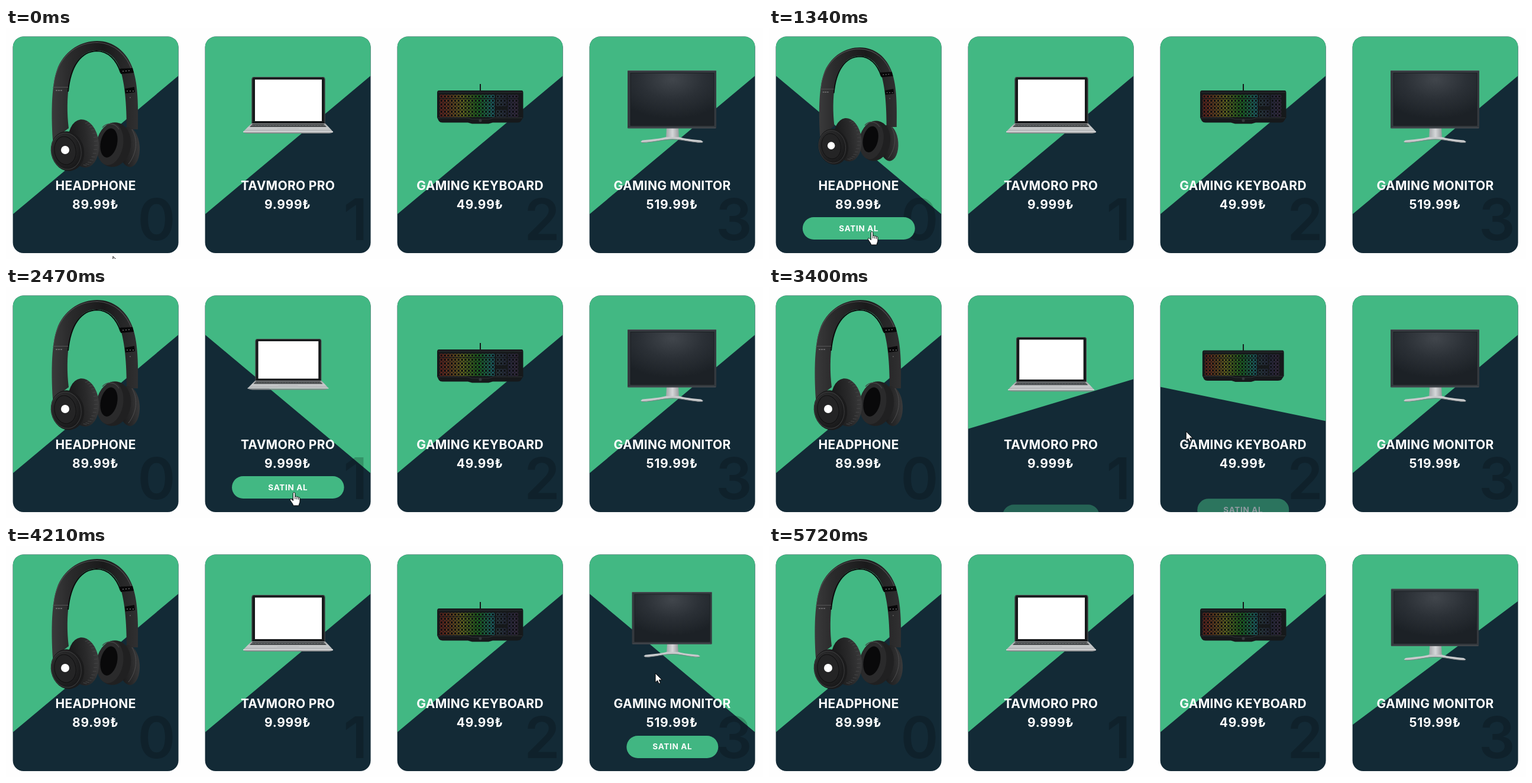
An HTML page that plays this animation: 1280x392 px, repeating every 5750 ms.

```html
<!DOCTYPE html>
<html lang="tr">
<head>
<meta charset="utf-8">
<title>Product cards</title>
<style>
  html, body { margin: 0; width: 100%; height: 100%; overflow: hidden; background: #fefefe; }
  svg { display: block; width: 100vw; height: 100vh; }
  text { font-family: Inter, "Open Sans", sans-serif; font-weight: 700; fill: #fff; text-anchor: middle; }
  .title { font-size: 21px; letter-spacing: .3px; }
  .price { font-size: 21px; letter-spacing: .7px; }
  .digit { font-size: 97px; font-weight: 600; text-anchor: end; fill: #000; opacity: .2; }
  .label { font-size: 13.5px; letter-spacing: .7px; }
</style>
</head>
<body>
<svg id="stage" viewBox="0 0 1280 392" xmlns="http://www.w3.org/2000/svg">
  <defs>
    <linearGradient id="band">
      <stop offset="0" stop-color="#3a3a3b"/><stop offset=".2" stop-color="#2b2b2c"/>
      <stop offset=".6" stop-color="#1a1a1b"/><stop offset="1" stop-color="#303031"/>
    </linearGradient>
    <linearGradient id="pad">
      <stop offset="0" stop-color="#161617"/><stop offset=".6" stop-color="#29292a"/><stop offset="1" stop-color="#3a3a3b"/>
    </linearGradient>
    <radialGradient id="cup" cx=".4" cy=".35" r=".7">
      <stop offset="0" stop-color="#353536"/><stop offset="1" stop-color="#171718"/>
    </radialGradient>
    <linearGradient id="silver" x2="0" y2="1">
      <stop offset="0" stop-color="#9a9c9e"/><stop offset=".5" stop-color="#c9cbcc"/><stop offset="1" stop-color="#b2b4b6"/>
    </linearGradient>
    <linearGradient id="neck">
      <stop offset="0" stop-color="#a2a5a8"/><stop offset=".5" stop-color="#d5d7d9"/><stop offset="1" stop-color="#96999c"/>
    </linearGradient>
    <radialGradient id="panel" cx=".5" cy=".12" r=".75">
      <stop offset="0" stop-color="#41464c"/><stop offset=".5" stop-color="#2b3036"/><stop offset="1" stop-color="#1c2126"/>
    </radialGradient>
  </defs>
  <g id="cards"></g>
  <g id="cursor" stroke="#000" fill="#fff" stroke-linejoin="round">
    <path id="arrow" d="M0 0V15.5L3.6 12.2L6 17.6L8.6 16.5L6.3 11.2H11.2Z"/>
    <path id="hand" d="M-1.6 1.2C-1.6 -.8 1.8 -.8 1.8 1.2V7C2.4 5.7 4.6 6 4.8 7.6C5.4 6.5 7.4 6.8 7.6 8.4C8.4 7.5 10 8 10 9.8V15C10 17.6 8.2 18.6 8.2 22H-1.4C-1.6 18.8 -4.4 16.6 -6.6 12.6C-7.2 10.6 -5 10 -3.6 11.6L-1.6 13.6ZM1.8 7V11M4.8 8V11.4M7.6 8.6V11.8"/>
  </g>
</svg>
<script>
const LOOP = 5750, GREEN = "#42b883", DARK = "#132a36";
const LEFT = 11.6, PITCH = 325, WIDTH = 280, TOP = 14.6, BOTTOM = 382, MID_Y = 198.5;
const SKEW_MS = 500, SLOW_MS = 610, LIFT = 81;

const headphone = () => {
  let ribs = "";
  for (let i = 0; i < 15; i++) {
    const a = -1.25 + i * .19;
    const x = 133 + 22 * Math.cos(a), y = 196 + 38 * Math.sin(a);
    ribs += `M${x.toFixed(1)} ${y.toFixed(1)}l-6 ${(2 - i * .25).toFixed(1)}`;
  }
  return `
  <path fill="url(#band)" d="M79 190C76 140 77 94 88 66C102 36 128 22 154 22C182 22 204 40 214 68C222 92 224 120 223 172L204 172C204 130 201 94 193 70C186 50 172 38 153 38C130 38 113 58 107 92C103 118 103 145 106 170Z"/>
  <path fill="none" stroke="#4b4b4c" stroke-width="1.2" d="M81 96C86 54 114 25 154 24.500C184 26 204 46 213 72"/>
  <path fill="none" stroke="#0b0b0c" stroke-width="2" d="M105 108C109 64 127 40 153 39C173 39 187 54 194 76"/>
  <path stroke="#565657" d="M79 100.500H105"/>
  <path stroke="#747475" stroke-width="1.6" stroke-dasharray="3 1" d="M84 106H96"/>
  <path fill="#080809" d="M192 69L214 68L216 76L194 78ZM201 103L217 100L218 109L202 111Z"/>
  <path stroke="#6a6a6b" stroke-width="1.5" stroke-dasharray="2 3" d="M197 73.500L212 72M204 107H216"/>
  <circle cx="210" cy="118" r=".9" fill="#666"/>
  <ellipse cx="208" cy="202" rx="18" ry="34" fill="url(#pad)" transform="rotate(-4 208 202)"/>
  <path fill="none" stroke="#4d4d4e" d="M213 172C223 188 222 212 207 231"/>
  <ellipse cx="182" cy="198" rx="29" ry="38" fill="#202021" transform="rotate(9 182 198)"/>
  <ellipse cx="176" cy="197" rx="22" ry="36" fill="#2a2a2b" transform="rotate(10 176 197)"/>
  <ellipse cx="174" cy="195" rx="14" ry="25" fill="#09090a" transform="rotate(12 174 195)"/>
  <path fill="none" stroke="#454546" stroke-width="1.2" d="M163 169C170 160 184 160 191 172"/>
  <ellipse cx="131" cy="196" rx="26" ry="41" fill="url(#pad)" transform="rotate(-7 131 196)"/>
  <path stroke="#454546" fill="none" d="${ribs}"/>
  <ellipse cx="104" cy="209" rx="28" ry="34" fill="#1b1b1c" transform="rotate(-12 104 209)"/>
  <ellipse cx="102" cy="209" rx="25" ry="31" fill="url(#cup)" stroke="#3d3d3e" transform="rotate(-10 102 209)"/>
  <ellipse cx="100" cy="208" rx="18" ry="24" fill="#242425" stroke="#101011" transform="rotate(-10 100 208)"/>
  <circle cx="100" cy="207" r="7" fill="#fff"/>`;
};

const laptop = () => `
  <path fill="#17191b" d="M415.500 163V87Q415.500 83 419.500 83H535.500Q539.500 83 539.500 87V163Z"/>
  <path fill="none" stroke="#6c6f71" stroke-width=".7" d="M416 162V87Q416 83.400 419.500 83.400H535.500Q539 83.400 539 87V162"/>
  <rect x="421" y="87.500" width="113" height="70.500" fill="#fff"/>
  <path fill="url(#silver)" d="M415 162H540L553 176H401Z"/>
  <path fill="#45484a" d="M417 163H537L542 168H412Z"/>
  <path stroke="#85888a" stroke-width=".7" stroke-dasharray="4 1" d="M415 165.500H540"/>
  <path fill="#bcbec0" d="M459 170H495L497 174.500H457Z"/>
  <path fill="#dfe0e1" d="M401 175.500H553V177H401Z"/>
  <path fill="#85888a" d="M401 177H553Q550 179 544 179H410Q404 179 401 177Z"/>`;

const keyboard = () => {
  let keys = "";
  for (let r = 0; r < 6; r++) for (let c = 0; c < 22; c++) {
    if (c > 15 && c < 19 && r === 3) continue;
    const side = c > 15;
    const x = 734 + c * 5.8 + (side ? 2.5 : 0) + (c > 18 ? 2.5 : 0);
    const y = 114 + r * 6.2 + (r ? 1 : 0);
    const hue = 8 + 270 * (c / 21) ** 1.3;
    const ink = `hsl(${hue.toFixed()} ${side ? 25 : 65}% ${side ? 33 : 43}%)`;
    keys += `<rect x="${x.toFixed(1)}" y="${y.toFixed(1)}" width="4.600" height="4.600" rx=".8" fill="#0d0f11" stroke="${ink}" stroke-width=".8" opacity=".8"/>`;
  }
  return `
  <path fill="none" stroke="#15181a" stroke-width="2" d="M802 107V95"/>
  <path fill="#16191b" d="M732 106H872Q874.500 106 874.500 110V152L870 159Q868 160.500 864 160.500H823L816 162.500H788L781 160.500H738Q734 160.500 732 158L729 152V110Q729 106 732 106Z"/>
  <path fill="none" stroke="#34383b" stroke-width=".8" d="M731 109H873M730 152.500H780L788 155H816L824 152.500H873"/>
  ${keys}<circle cx="802" cy="157" r="2.500" fill="#34383b"/>`;
};

const monitor = () => `
  <path fill="url(#neck)" d="M1117 169H1137L1138 187H1116Z"/>
  <path fill="#c8cacc" d="M1116 185C1105 188 1090 189 1076 190.500L1073 193Q1077 195.500 1086 194C1102 192 1113 188.500 1127 188.500C1140 188.500 1151 192 1167 194Q1175 195.500 1179 193L1175 190.500C1160 189 1148 188 1138 185Z"/>
  <path fill="none" stroke="#74787b" stroke-width=".9" d="M1075 194.500C1096 194 1112 189 1127 189S1157 194 1178 194.500"/>
  <rect x="1051" y="72" width="150" height="98.500" rx="1.500" fill="#34393e"/>
  <rect x="1056" y="76.500" width="141" height="89" fill="url(#panel)" stroke="#171b1f" stroke-width=".8"/>
  <path stroke="#555a60" stroke-width=".8" d="M1051 72.500H1201M1052 169.500H1200"/>`;

const cards = [
  { name: "HEADPHONE", price: "89.99₺", art: headphone, on: 10, off: 1697, press: 850, release: 1662 },
  { name: "TAVMORO PRO", price: "9.999₺", art: laptop, on: 1738, off: 3191, press: 2040, release: 3172 },
  { name: "GAMING KEYBOARD", price: "49.99₺", art: keyboard, on: 3213, off: 3688 },
  { name: "GAMING MONITOR", price: "519.99₺", art: monitor, on: 3688, off: 5345 }
];

// Pointer stops: time, x, y
const stops = [
  [0, 181, 388], [20, 180, 380], [420, 167, 250], [510, 166, 246], [720, 166, 246],
  [850, 170, 322], [1000, 174, 346], [1655, 174, 346], [1697, 292, 342], [1738, 337, 338],
  [2030, 486, 330], [2110, 487, 349], [3160, 487, 349], [3191, 616, 310], [3213, 662, 285],
  [3400, 705, 245], [3560, 735, 240], [3680, 940, 226], [3730, 1098, 216],
  [5170, 1098, 216], [5345, 1092, 382], [5400, 1090, 400], [LOOP, 1090, 400]
];

const $ = id => document.getElementById(id);
const bez = (u, a, b) => 3 * u * (1 - u) ** 2 * a + 3 * u * u * (1 - u) * b + u ** 3;

// CSS "ease"
function ease(x) {
  if (x <= 0) return 0;
  if (x >= 1) return 1;
  let lo = 0, hi = 1;
  for (let i = 0; i < 24; i++) {
    const m = (lo + hi) / 2;
    if (bez(m, .25, .25) < x) lo = m; else hi = m;
  }
  return bez(lo, .1, 1);
}

const hover = (t, on, off, ms) => Math.max(0, ease((t - on) / ms) - ease((t - off) / ms));

$("cards").innerHTML = cards.map((c, i) => {
  c.x = LEFT + PITCH * i;
  c.mid = c.x + WIDTH / 2;
  const box = `x="${c.x}" y="${TOP}" width="${WIDTH}" height="${BOTTOM - TOP}"`;
  return `
  <clipPath id="clip${i}"><rect ${box} rx="18"/></clipPath>
  <rect ${box} rx="18" fill="${DARK}"/>
  <g clip-path="url(#clip${i})">
    <path id="slope${i}" fill="${GREEN}"/>
    <text class="digit" x="${c.x + 275}" y="360">${i}</text>
    <g id="art${i}">${c.art()}</g>
    <text class="title" x="${c.mid}" y="274.500">${c.name}</text>
    <text class="price" x="${c.mid - .3}" y="306.500">${c.price}</text>
    <g id="btn${i}">
      <rect id="pill${i}" y="321" height="38" rx="19" fill="${GREEN}"/>
      <text class="label" x="${c.mid + .3}" y="344.500">SATIN AL</text>
    </g>
  </g>`;
}).join("");

function drawCard(c, i, t) {
  const p = hover(t, c.on, c.off, SKEW_MS), q = hover(t, c.on, c.off, SLOW_MS);
  const rise = Math.tan((80 * p - 40) * Math.PI / 180) * WIDTH / 2;
  $("slope" + i).setAttribute("d",
    `M${c.x} ${MID_Y - rise}L${c.x + WIDTH} ${MID_Y + rise}V${TOP}H${c.x}Z`);
  $("art" + i).setAttribute("transform",
    `translate(${c.mid} 133) scale(${1 - .1 * q}) translate(${-c.mid} -133)`);
  const wide = c.press ? hover(t, c.press, c.release, 500) : 0;
  const w = 155 + 35 * wide;
  $("pill" + i).setAttribute("x", c.mid + .2 - w / 2);
  $("pill" + i).setAttribute("width", w);
  $("btn" + i).setAttribute("transform", `translate(0 ${LIFT * (1 - q)})`);
  $("btn" + i).setAttribute("opacity", q);
}

function drawCursor(t) {
  const k = stops.findIndex(s => s[0] > t);
  const [t0, x0, y0] = stops[k - 1], [t1, x1, y1] = stops[k];
  const f = (t - t0) / (t1 - t0);
  $("cursor").setAttribute("transform", `translate(${x0 + (x1 - x0) * f} ${y0 + (y1 - y0) * f})`);
  const pointing = cards.some(c => c.press && t >= c.press && t < c.release);
  $("hand").style.display = pointing ? "" : "none";
  $("arrow").style.display = pointing ? "none" : "";
}

function frame() {
  const t = performance.now() % LOOP;
  cards.forEach((c, i) => drawCard(c, i, t));
  drawCursor(t);
  requestAnimationFrame(frame);
}
frame();
</script>
</body>
</html>
```
